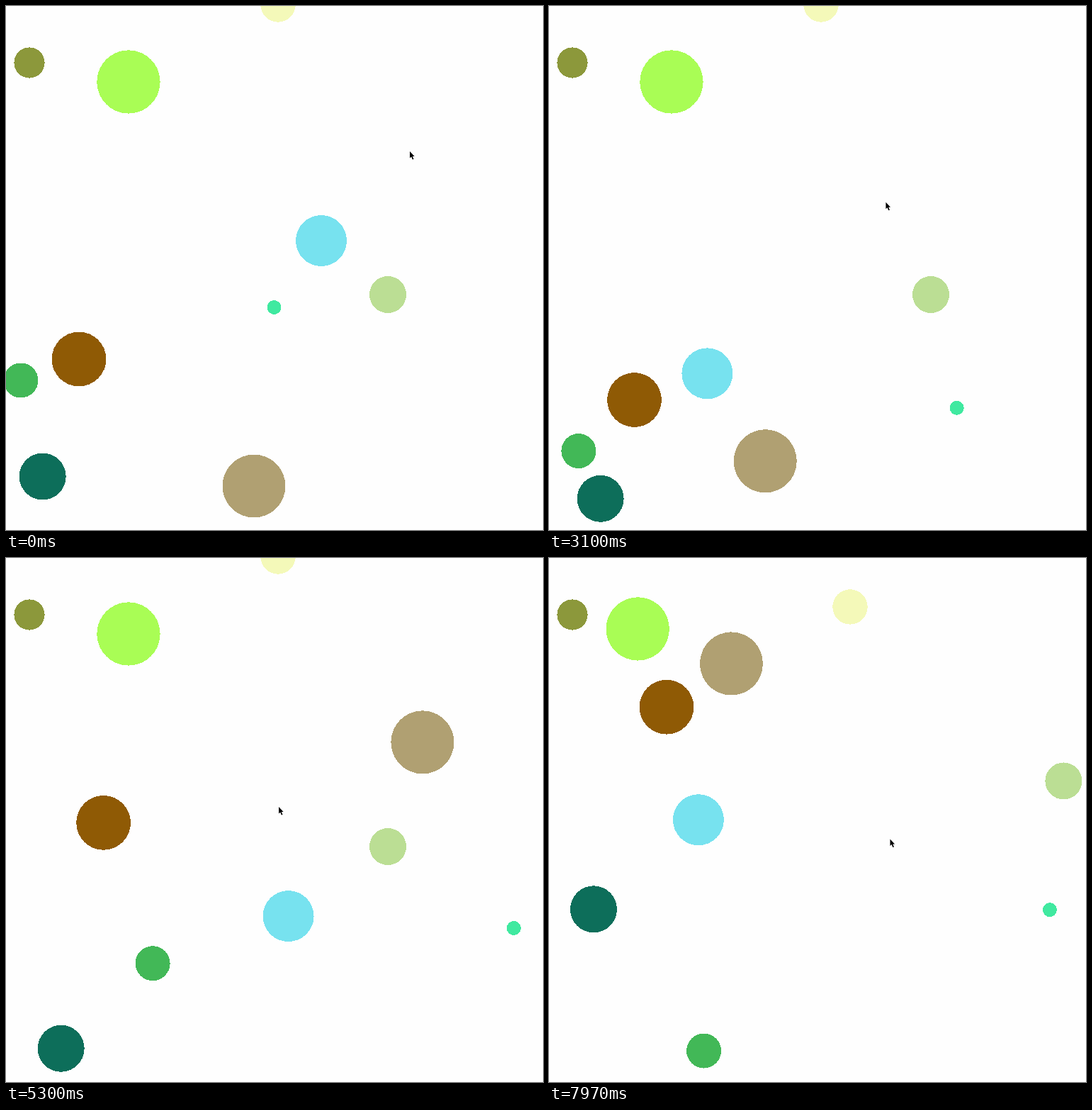
Recreate the animation shown at these times as an HTML page. Size 758 by 739 pixels, loop 8000 ms.

```html
<!DOCTYPE html>
<html lang="en">
<head>
<meta charset="utf-8">
<title>Rolling balls</title>
<style>
  html, body { margin: 0; width: 100%; height: 100%; overflow: hidden; background: #fefefe; }
  svg { display: block; }
  circle { shape-rendering: crispEdges; }
</style>
</head>
<body>
<svg id="table" width="758" height="739" viewBox="0 0 758 739"></svg>
<script>
const LOOP = 8, END = 7.97, DRAG = 0.31;
const WALL = { left: -4, right: 762.5, bottom: 743.5 };
const table = document.getElementById('table');

function shape(tag, attrs) {
  const el = document.createElementNS('http://www.w3.org/2000/svg', tag);
  for (const name in attrs) el.setAttribute(name, attrs[name]);
  return table.appendChild(el);
}

// A hit [s, vx, vy] gives a ball a new velocity in px/s; drag and walls do the rest.
const balls = [];
function ball(fill, r, x, y, ...hits) {
  balls.push({ el: shape('circle', { r, fill }), r, x, y, hits });
}

ball('#f4f9b9', 24.7, 384, -2, [6.64, 37.6, 65.1]);
ball('#8c983b', 21.6, 33, 80);
ball('#a9fd55', 44.6, 173, 107, [7.39, -89.9, -13.2]);
ball('#77e2ef', 36, 445, 331,
  [0.28, -254, 150.7], [1.558, 11.5, -77.6], [2.88, 159, 526.6],
  [3.235, -172.2, 192.9], [3.73, 2.9, 261.3], [3.87, 202.7, -174.9],
  [5.94, 169.5, -23.6], [7, -970.5, 247], [7.28, -942, 643], [7.64, 526, -1067]);
ball('#bbde94', 26, 539, 407, [5.94, 137.8, -61.4]);
ball('#40e9a0', 10, 378.5, 425, [0.572, -2.1, 281.6], [1.397, 150.1, -47.7]);
ball('#8f5a05', 38.4, 103, 498,
  [1.558, 26.6, 28.3], [2.94, -78.9, 163.7], [3.42, 28, -161]);
ball('#42b857', 24.5, 21, 528,
  [1.7, 20.5, 143.6], [2.34, 13.2, 23.9], [3.45, -150.1, -44.1], [7.28, -182.9, 257.7]);
ball('#0d6e5a', 33, 51.7, 663.5,
  [2.34, 30.9, 92.5], [3.73, 209, 132], [3.87, -32.5, 50.3], [7.64, 63.8, -454.9]);
ball('#b0a072', 44.5, 350, 677,
  [1.397, -33.8, 59.8], [3.235, 357.5, 328.3], [6.64, -183.5, 60.9], [7.39, -2.3, 71.4]);

// Seconds of full-speed travel left after drag.
const glide = s => (1 - Math.exp(-DRAG * s)) / DRAG;
const mirror = (v, low, high) => v < low ? 2 * low - v : v > high ? 2 * high - v : v;

function place({ r, x, y, hits }, t) {
  hits.forEach(([from, vx, vy], i) => {
    if (t <= from) return;
    const until = i + 1 < hits.length ? hits[i + 1][0] : END;
    const d = glide(Math.min(t, until) - from);
    x = mirror(x + vx * d, WALL.left + r, WALL.right - r);
    y = mirror(y + vy * d, -Infinity, WALL.bottom - r);
  });
  return [x, y];
}

// Key points of the pointer: [s, x, y].
const stops = [
  [0.27, 570, 205], [2.2, 454, 312], [2.8, 557, 224], [3.73, 305, 387],
  [4.67, 365, 347], [5.93, 405, 355], [6.93, 542, 404], [END, 481.5, 396.5]
];
const arrow = shape('path', {
  d: 'M0 0V9.4L2.1 7.5L3.8 11.6L5.5 10.9L3.8 6.9H6.6Z',
  stroke: '#fff', 'stroke-width': 1.5, 'paint-order': 'stroke'
});

function point(t) {
  const i = Math.max(1, stops.findIndex(s => s[0] >= t));
  const [t0, x0, y0] = stops[i - 1], [t1, x1, y1] = stops[i];
  const k = Math.max(0, (t - t0) / (t1 - t0));
  return [x0 + (x1 - x0) * k, y0 + (y1 - y0) * k];
}

function draw(t) {
  for (const b of balls) {
    const [x, y] = place(b, t);
    b.el.setAttribute('cx', x);
    b.el.setAttribute('cy', y);
  }
  arrow.setAttribute('transform', `translate(${point(Math.min(t, END))})`);
}

const start = performance.now();
function tick(now) {
  draw(Math.max(0, now - start) / 1000 % LOOP);
  requestAnimationFrame(tick);
}
draw(0);
requestAnimationFrame(tick);
</script>
</body>
</html>
```
